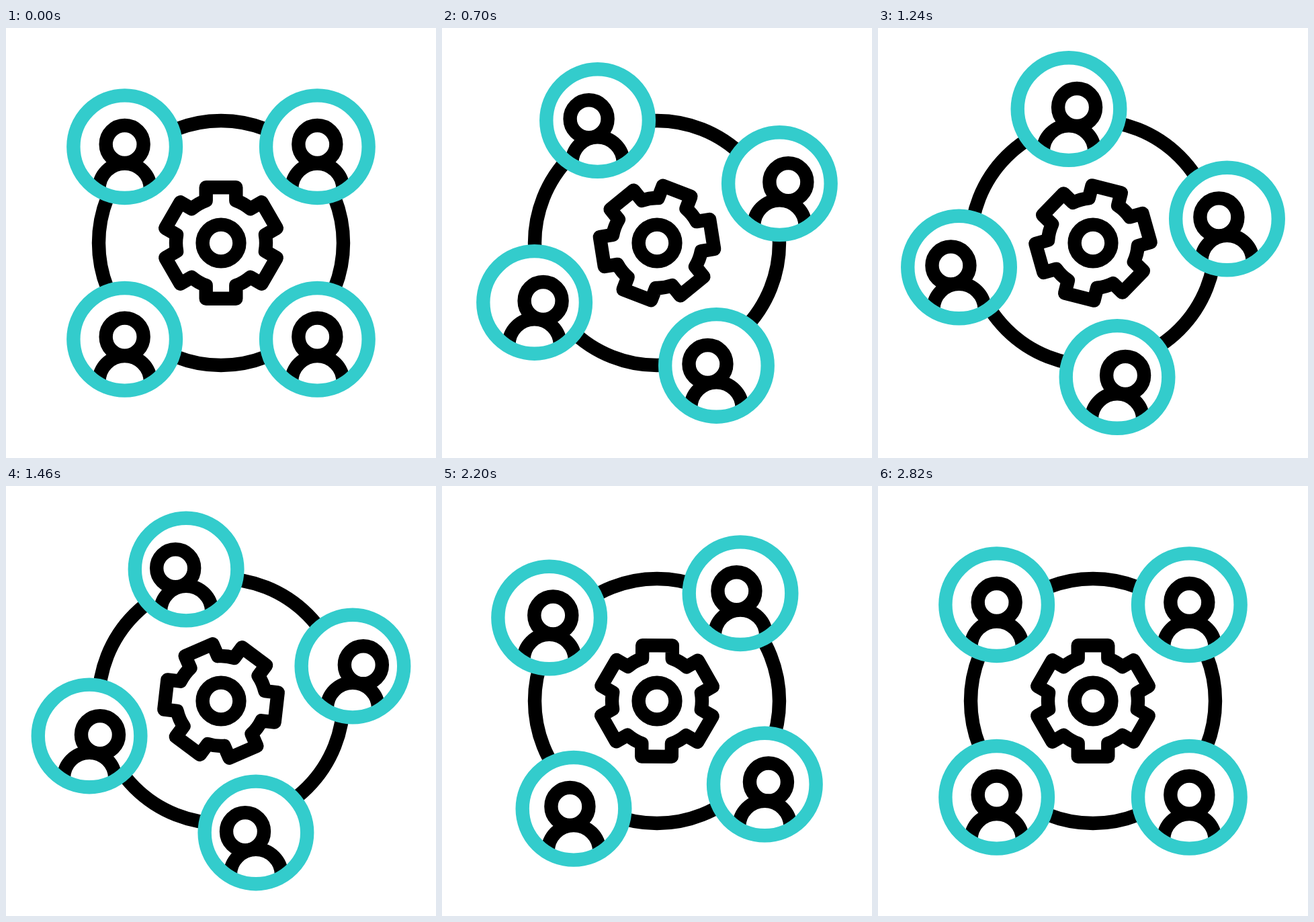
An HTML page with a canvas that plays this animation: 640x640 px, repeating every 3.2 s.

```html
<!DOCTYPE html>
<html lang="en">
<head>
<meta charset="utf-8">
<title>Team workflow</title>
<style>
html, body { margin: 0; width: 100%; height: 100%; overflow: hidden; background: #fff; }
canvas { display: block; width: 100vmin; height: 100vmin; }
</style>
</head>
<body>
<canvas id="stage" width="640" height="640"></canvas>
<script>
const ctx = document.getElementById('stage').getContext('2d');
const LOOP = 3200, RAD = Math.PI / 180;
const BLACK = '#000', TEAL = '#33cccc', LINE = 20.4;

// Keys are [time in ms, degrees]
const orbitKeys = [[0, 0], [381, -10.8], [1954, 375.2], [2278, 350], [2599, 360]];
const gearKeys = [[0, 0], [441, -15], [1730, 375], [2255, 360]];
const swayKeys = [[0, 0], [570, -12.2], [1475, 13.8], [1930, -7.5], [2360, 9.5], [2820, 0]];

// Smooth ease; a larger bend holds longer at both ends
function ease(x, bend) {
  let lo = 0, hi = 1;
  for (let i = 0; i < 24; i++) {
    const s = (lo + hi) / 2;
    if (s + bend * s * (0.5 - 1.5 * s + s * s) < x) lo = s; else hi = s;
  }
  return lo * lo * (3 - 2 * lo);
}

function valueAt(keys, t, bend) {
  for (let i = 1; i < keys.length; i++) {
    const [t0, a] = keys[i - 1], [t1, b] = keys[i];
    if (t < t1) return a + (b - a) * ease((t - t0) / (t1 - t0), bend);
  }
  return keys[keys.length - 1][1];
}

function ring(x, y, r, color, fill) {
  ctx.beginPath();
  ctx.arc(x, y, r, 0, 2 * Math.PI);
  if (fill) {
    ctx.fillStyle = fill;
    ctx.fill();
  }
  if (color) {
    ctx.strokeStyle = color;
    ctx.stroke();
  }
}

function gear(deg) {
  const half = 22.3, top = 82.7, root = 67;
  const side = Math.asin(half / root), tip = Math.atan2(half, top);
  const reach = Math.hypot(half, top);
  ctx.save();
  ctx.rotate(deg * RAD);
  ctx.beginPath();
  for (let i = 0; i < 6; i++) {
    const mid = i * 60 * RAD - Math.PI / 2;
    for (const a of [mid - tip, mid + tip]) {
      ctx.lineTo(reach * Math.cos(a), reach * Math.sin(a));
    }
    ctx.arc(0, 0, root, mid + side, mid + 60 * RAD - side);
  }
  ctx.closePath();
  ctx.strokeStyle = BLACK;
  ctx.stroke();
  ctx.restore();
}

function member(x, y, sway) {
  const base = 63, neck = 66.7, a = sway * RAD;
  ctx.save();
  ctx.translate(x, y);
  ring(0, 0, 76.3, null, '#fff');
  ctx.save();
  ctx.clip();
  ring(0, base, 38.2, BLACK);
  ring(neck * Math.sin(a), base - neck * Math.cos(a), 28, BLACK);
  ctx.restore();
  ring(0, 0, 76.3, TEAL);
  ctx.restore();
}

function draw(t) {
  const orbit = valueAt(orbitKeys, t, 0.7);
  const sway = valueAt(swayKeys, t, 0.7);
  ctx.fillStyle = '#fff';
  ctx.fillRect(0, 0, 640, 640);
  ctx.save();
  ctx.translate(320, 320);
  ctx.lineWidth = LINE;
  ctx.lineJoin = 'round';
  ring(0, 0, 182, BLACK);
  gear(valueAt(gearKeys, t, 0.3));
  ring(0, 0, 27.4, BLACK);
  for (let i = 0; i < 4; i++) {
    const a = (225 + 90 * i + orbit) * RAD;
    member(202.7 * Math.cos(a), 202.7 * Math.sin(a), i % 2 ? -sway : sway);
  }
  ctx.restore();
}

const start = performance.now();
function tick(now) {
  draw(Math.max(0, now - start) % LOOP);
  requestAnimationFrame(tick);
}
draw(0);
requestAnimationFrame(tick);
</script>
</body>
</html>
```
